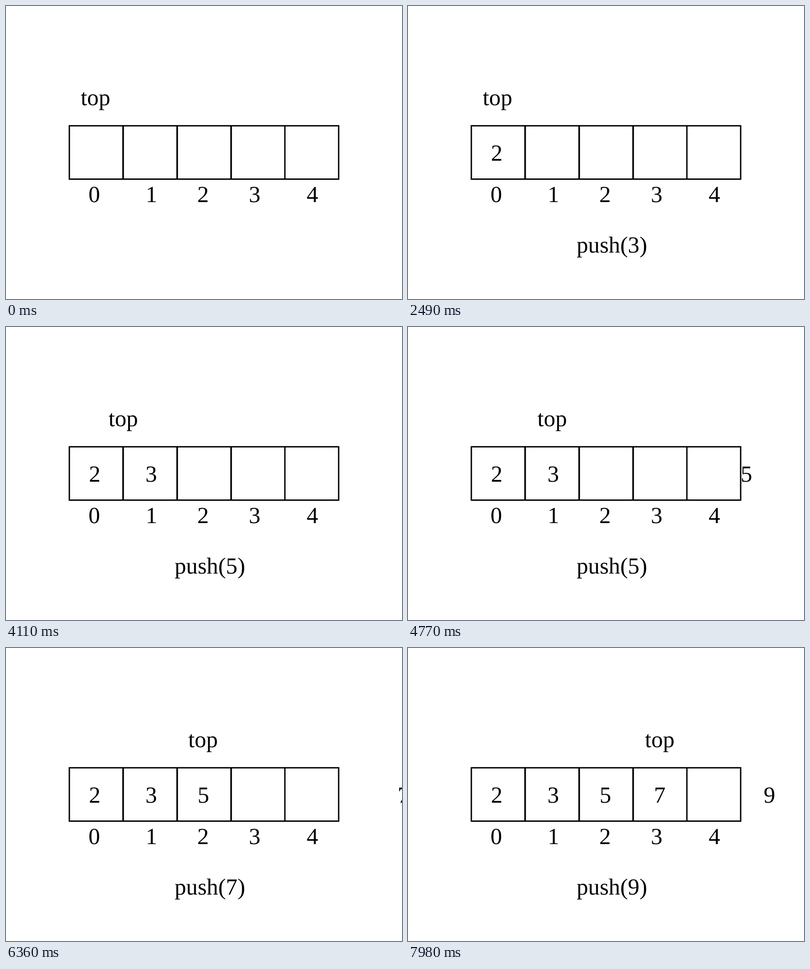
These frames come from a looping animation (869x644 px, 8 s). An HTML page:

```html
<!DOCTYPE html>
<html lang="en">
<head>
<meta charset="utf-8">
<title>Stack push</title>
<style>
  html, body { margin: 0; width: 100%; height: 100%; overflow: hidden; background: #fff; }
  svg { display: block; }
  text { font: 50.67px "Liberation Serif", "Times New Roman", serif; text-rendering: geometricPrecision; }
  path { fill: none; stroke: #000; stroke-width: 3; }
</style>
</head>
<body>
<svg id="stage" width="869" height="644" viewBox="0 0 869 644">
  <path d="M139 263.3H730V380.6H139ZM612 263V381"/>
  <path d="M257 263V381M375.6 263V381M494 263V381" style="stroke-width:3.6"/>
</svg>
<script>
const LOOP = 8000, FRAME = 30;
const stage = document.getElementById('stage');

function addText(content, x, y) {
  const node = document.createElementNS('http://www.w3.org/2000/svg', 'text');
  node.textContent = content;
  node.setAttribute('x', x);
  node.setAttribute('y', y);
  stage.append(node);
  return node;
}

[181, 306.5, 419.7, 533, 659.8].forEach((x, i) => addText(i, x, 431));

// Each value slides in from the right at constant speed (px per ms).
const values = [
  { digit: 2, x: 182, arrive: 2010, speed: 0.69 },
  { digit: 3, x: 306, arrive: 3810, speed: 0.647 },
  { digit: 5, x: 420.6, arrive: 5464, speed: 0.4457 },
  { digit: 7, x: 539.8, arrive: 6960, speed: 0.533 },
  { digit: 9, x: 660, arrive: 8418, speed: 0.275 }
].map(v => ({ ...v, node: addText(v.digit, v.x, 339.7) }));

const topMoves = [
  { start: 3770, end: 4440, by: 120 },
  { start: 5460, end: 5880, by: 116 },
  { start: 6960, end: 7230, by: 120 }
];
const calls = [[0, 2], [2490, 3], [3990, 5], [5910, 7], [7230, 9]];

const topLabel = addText('top', 164, 218);
const callLabel = addText('', 370, 542);

const clamp = v => Math.min(1, Math.max(0, v));

function draw(now) {
  const t = Math.floor(now % LOOP / FRAME) * FRAME;

  for (const v of values)
    v.node.setAttribute('x', v.x + Math.max(0, v.arrive - t) * v.speed);

  topLabel.setAttribute('x', topMoves.reduce(
    (x, m) => x + m.by * clamp((t - m.start) / (m.end - m.start)), 164));

  const [, argument] = calls.findLast(([time]) => t >= time);
  callLabel.textContent = `push(${argument})`;
  // Fade in through eight even levels.
  callLabel.setAttribute('opacity', t < 120 ? 0 : (1 + Math.floor(7 * clamp((t - 120) / 780))) / 8);
}

const begin = performance.now();
function tick() {
  draw(performance.now() - begin);
  requestAnimationFrame(tick);
}
tick();
</script>
</body>
</html>
```
